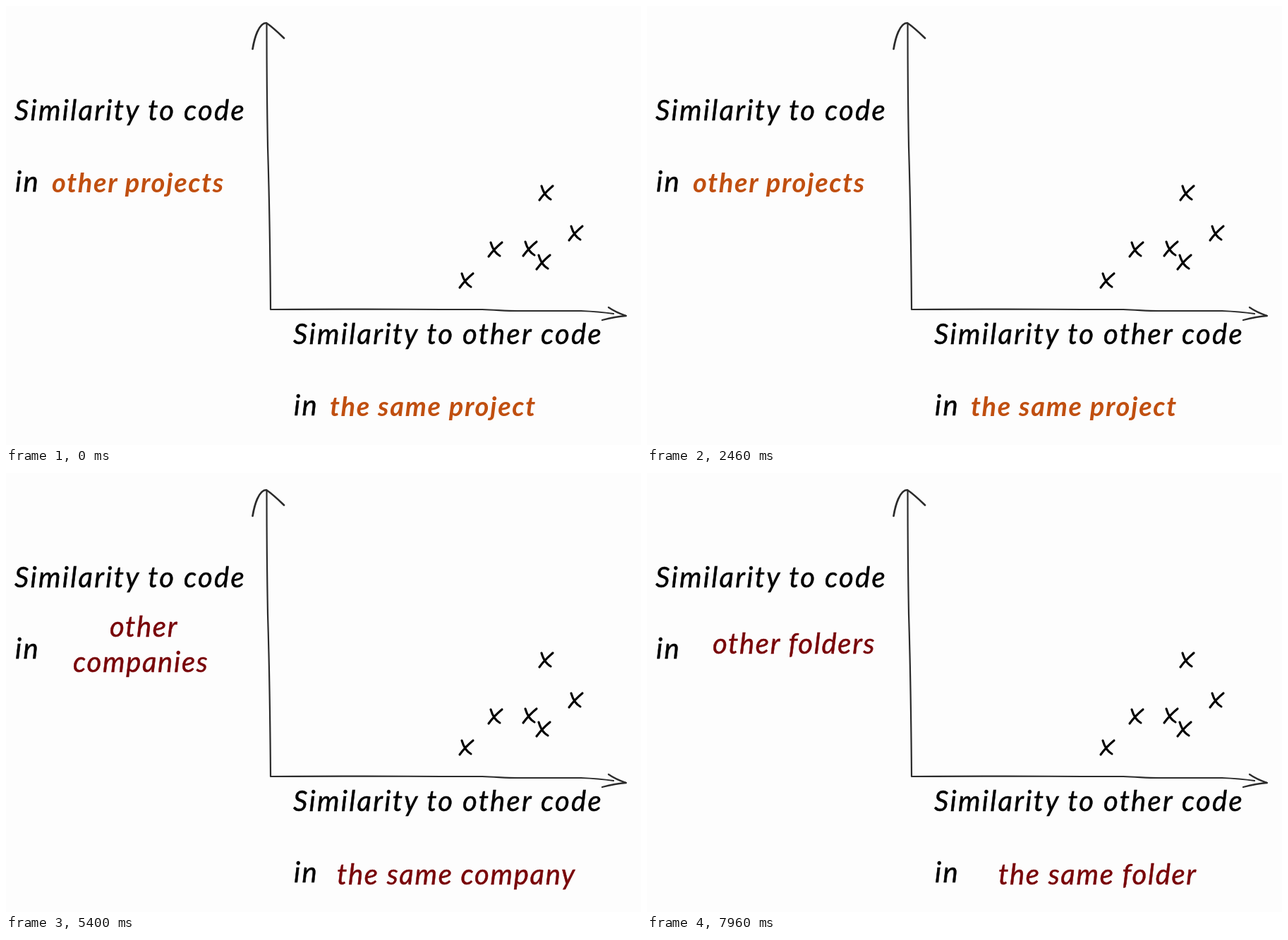
An HTML page that plays this animation: 900x622 px, repeating every 8000 ms.

```html
<!DOCTYPE html>
<html lang="en">
<head>
<meta charset="utf-8">
<title>Code similarity</title>
<style>
  html, body { margin: 0; width: 100%; height: 100%; overflow: hidden; background: #fdfdfd; }
  svg { display: block; width: 100vw; height: 100vh; }
  text { font: italic 40px Lato, "Open Sans", sans-serif; letter-spacing: 2.3px; stroke: #000; stroke-width: .5; }
  .scene { visibility: hidden; }
  .scene text { letter-spacing: 1.7px; fill: #780408; stroke: #780408; }
  .scene.bold text { font-weight: 700; font-size: 38px; fill: #c04f10; stroke: none; }
  path { fill: none; stroke-linecap: round; stroke-linejoin: round; }
</style>
</head>
<body>
<svg viewBox="0 0 900 622">
  <g stroke="#2b2b2b" stroke-width="2.2">
    <path d="M369.5 25 Q369.5 120 371 200 Q374 300 375 430 C470 429 570 430 675 430 C700 431 710 432 725 432 H815 Q840 433 861 436"/>
    <path stroke-width="2.7" d="M349.5 61 C352 46 358 24 369 24 Q378 30 394 45.5"/>
    <path stroke-width="2.3" d="M854 427 Q864 434 879 439 Q864 440 845 445"/>
  </g>
  <g id="marks" stroke="#000" stroke-width="3.1"></g>
  <text x="12" y="162">Similarity to code</text>
  <text x="13" y="263">in</text>
  <text x="407" y="479">Similarity to other code</text>
  <text x="408" y="580">in</text>

  <g class="scene bold">
    <text x="65" y="264">other projects</text>
    <text x="459" y="581">the same project</text>
  </g>
  <g class="scene">
    <text x="147" y="232">other</text>
    <text x="95" y="282">companies</text>
    <text x="469" y="583">the same company</text>
  </g>
  <g class="scene">
    <text x="93" y="256">other folders</text>
    <text x="498" y="583">the same folder</text>
  </g>
</svg>
<script>
  const LOOP = 8000;
  const sceneStarts = [0, 2500, 6700];
  const points = [[765, 264], [807, 321], [693, 344], [742, 343], [761, 362], [652, 388]];

  document.getElementById("marks").innerHTML = points.map(([x, y]) =>
    `<path d="M${x - 6} ${y - 9} Q${x - 2} ${y + 5} ${x + 7} ${y + 10} M${x + 10} ${y - 9} Q${x - 1} ${y} ${x - 9} ${y + 11}"/>`
  ).join("");

  const scenes = document.querySelectorAll(".scene");
  const start = performance.now();

  function draw() {
    const time = (performance.now() - start) % LOOP;
    const current = sceneStarts.filter(begin => begin <= time).length - 1;
    scenes.forEach((scene, i) => {
      scene.style.visibility = i === current ? "visible" : "hidden";
    });
    requestAnimationFrame(draw);
  }
  draw();
</script>
</body>
</html>
```
